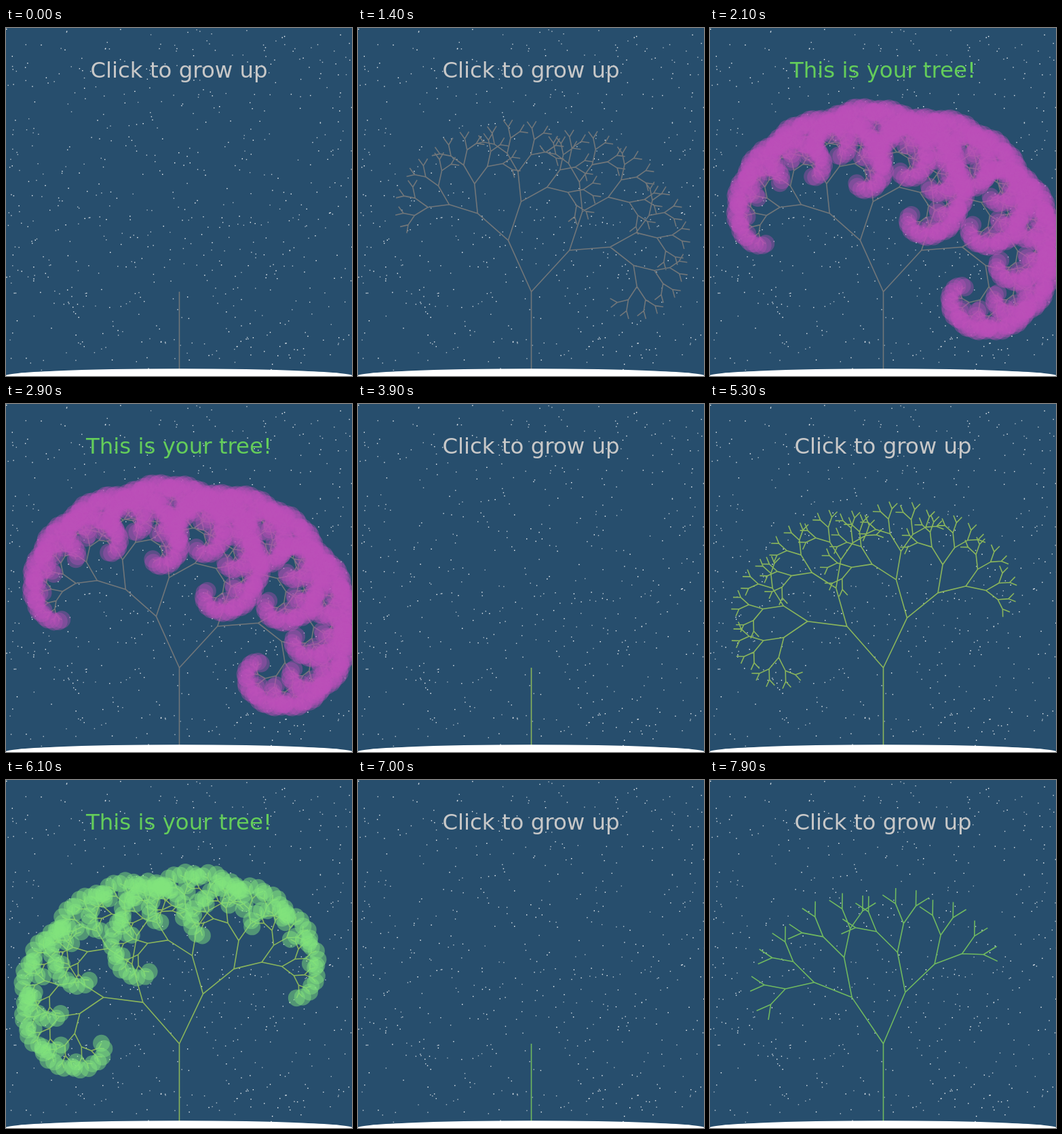
Animation of 510x512 px, one loop 8 s. Source, as an HTML page with a canvas:

```html
<!DOCTYPE html>
<html lang="en">
<head>
<meta charset="utf-8">
<title>Growing trees</title>
<style>
  html, body { margin: 0; width: 510px; height: 512px; overflow: hidden; background: #274e6d; }
  canvas { display: block; }
</style>
</head>
<body>
<canvas id="stage" width="510" height="512"></canvas>
<script>
const W = 510, H = 512, LOOP = 8000, STEP = 200;
const ctx = document.getElementById('stage').getContext('2d');

// Angles in degrees; each tree gains one level per step and blooms at its last level.
const trees = [
  { start: 0, left: 24.3, right: 42.7, length: 82.9, ratio: 0.726, levels: 10,
    wood: '#717679', bloom: '#bc50ba', alpha: 0.36, radius: 13 },
  { start: 3900, left: 41.4, right: 25.5, length: 81.2, ratio: 0.721, levels: 8,
    wood: '#8ab55b', bloom: '#82e47d', alpha: 0.48, radius: 12.5 },
  { start: 6900, left: 34.2, right: 23.1, length: 82.4, ratio: 0.726, levels: 9,
    wood: '#70b95f', bloom: '#82e47d', alpha: 0.48, radius: 12.5 }
];

function seeded(seed) {
  return () => (seed = (seed * 16807) % 2147483647) / 2147483647;
}

const random = seeded(4217);
const stars = Array.from({ length: 620 }, () => ({
  x: random() * W, y: random() * H, glow: 0.55 + random() * 0.45
}));

function drawSky() {
  ctx.fillStyle = '#274e6d';
  ctx.fillRect(0, 0, W, H);
  ctx.fillStyle = '#fff';
  for (const star of stars) {
    ctx.globalAlpha = star.glow;
    ctx.fillRect(star.x, star.y, 1.4, 1.4);
  }
  ctx.globalAlpha = 1;
}

function grow(tree, x, y, angle, length, level, tips) {
  if (!level) {
    tips.push([x, y]);
    return;
  }
  for (const turn of [-tree.left, tree.right]) {
    const a = angle + turn * Math.PI / 180;
    const endX = x + length * Math.sin(a), endY = y - length * Math.cos(a);
    ctx.moveTo(x, y);
    ctx.lineTo(endX, endY);
    grow(tree, endX, endY, a, length * tree.ratio, level - 1, tips);
  }
}

function drawTree(tree, level) {
  const tips = [];
  ctx.strokeStyle = tree.wood;
  ctx.lineWidth = 1.6;
  ctx.beginPath();
  ctx.moveTo(255.5, 504);
  ctx.lineTo(255.5, 388);
  grow(tree, 255.5, 388, 0, tree.length, level, tips);
  ctx.stroke();
  if (level < tree.levels) return;

  ctx.fillStyle = tree.bloom;
  ctx.globalAlpha = tree.alpha;
  for (const [x, y] of tips) {
    ctx.beginPath();
    ctx.arc(x, y, tree.radius, 0, Math.PI * 2);
    ctx.fill();
  }
  ctx.globalAlpha = 1;
}

function drawSnow() {
  ctx.fillStyle = '#fff';
  ctx.beginPath();
  ctx.ellipse(255, 512, 257, 10.7, 0, 0, Math.PI * 2);
  ctx.fill();
}

function drawTitle(done) {
  ctx.font = '32.4px "DejaVu Sans", sans-serif';
  ctx.textAlign = 'center';
  ctx.fillStyle = done ? '#64cd5a' : '#c8c8c8';
  ctx.fillText(done ? 'This is your tree!' : 'Click to grow up', 255, 73);
}

let shown = '';

function frame(now) {
  const t = now % LOOP;
  const index = trees.findLastIndex(tree => t >= tree.start);
  const tree = trees[index];
  const level = Math.min(tree.levels, Math.floor((t - tree.start) / STEP));
  const state = index + ':' + level;
  if (state !== shown) {
    shown = state;
    drawSky();
    drawTree(tree, level);
    drawSnow();
    drawTitle(level === tree.levels);
  }
  requestAnimationFrame(frame);
}

frame(0);
</script>
</body>
</html>
```
